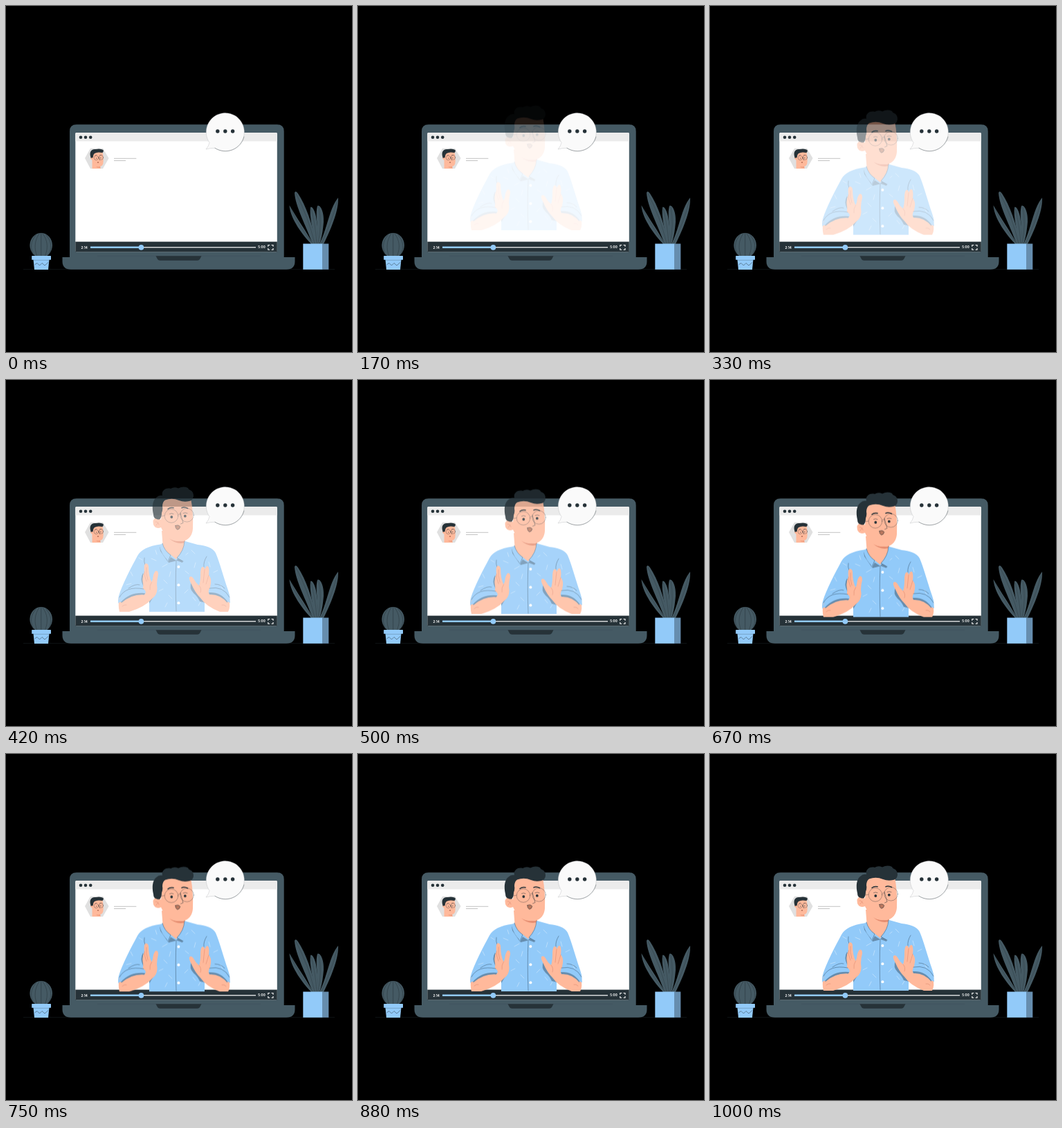
An HTML page for the animation above (1.04 s loop, 500 by 500 pixels).

```html
<!DOCTYPE html>
<html lang="en">
<head>
<meta charset="utf-8">
<title>Video lesson</title>
<style>
  html, body { margin: 0; width: 100%; height: 100%; overflow: hidden; background: #000; }
  svg { display: block; width: 100vw; height: 100vh; }
  text { font: 700 4.5px Inter, "Open Sans", sans-serif; fill: #fff; }
  .slate { fill: #455a64; }
  .ink { fill: #263238; }
  .blue { fill: #92caf9; }
  .shade { fill: #668dae; }
  .skin { fill: #ffb99b; }
  .blush { fill: #e58d70; }
  .line, .fold, .crease { fill: none; stroke-width: .5; stroke-linecap: round; stroke-linejoin: round; }
  .line { stroke: #263238; }
  .fold { stroke: #36536b; }
  .crease { stroke: #d98268; }
  .thin { stroke-width: .35; }
  .bold { stroke-width: 1.6; }
  .man { animation: drop 1040ms infinite; }
  /* The easing overshoots, so the figure dips a little and settles. */
  @keyframes drop {
    0%, 7.6% { opacity: 0; transform: translateY(-20px); }
    7.7% { opacity: .03; transform: translateY(-20px); animation-timing-function: cubic-bezier(.33, .26, .5, 1.38); }
    92.3%, 100% { opacity: 1; transform: none; }
  }
</style>
</head>
<body>
<svg viewBox="0 0 500 500">
  <clipPath id="cut"><rect x="150" y="150" width="190" height="191.2"/></clipPath>
  <path d="M25 380.5H475" stroke="#1b2327" stroke-width=".5"/>

  <g id="cactus">
    <ellipse class="slate" cx="50.7" cy="345.8" rx="16.3" ry="17.8"/>
    <path class="line" d="M50.7 328V362M48 329Q38 344 45 362M53 329Q64 344 56 362M43 331Q32 345 40 360M58 331Q70 345 61 360" stroke-dasharray="2.2 .8"/>
    <path class="blue" d="M39.5 366H62.5L61 381H41Z"/>
    <path class="shade" d="M39.7 366.6H62.4L62.2 367.6H39.9Z"/>
    <rect class="blue" x="37.2" y="361" width="27.8" height="5.8" rx=".6"/>
    <path class="line" d="M42 373.5L45 371.5L48.500 375L52 371.5L56 375L61 370.5"/>
  </g>

  <g id="plant">
    <g class="slate">
      <path d="M441 344C430 332 411 309 409.5 288C420 306 434 326 444 344Z"/>
      <path d="M443 344C434 318 418 290 417 270C418 267 420 268 422 271C433 288 443 314 448 344Z"/>
      <path d="M446 344C444 324 438 304 440 291C443 288 448 299 449 311C451 322 451 335 451 344Z"/>
      <path d="M449 344C453 326 446 303 450 289C454 286 460 298 459 312C458 325 456 336 453 344Z"/>
      <path d="M453 344C462 325 465 308 471 293Q475 283 480 277C481 293 472 318 459 344Z"/>
    </g>
    <path class="line thin" d="M443 343Q423 318 411 292M446 343Q437 305 419 271M449 343Q447 314 441 293M451 343Q457 316 452 290M456 343Q470 314 479 281"/>
    <rect class="blue" x="429.3" y="343.5" width="28" height="37.3"/>
    <rect class="shade" x="457" y="343.5" width="9.3" height="37.3"/>
  </g>

  <g id="laptop">
    <path class="slate" d="M92 364V181Q92 171.300 102 171.300H391.700Q401.700 171.300 401.700 181V364Z"/>
    <path class="slate" d="M81.500 363H417.500V369Q417.500 380.800 405 380.800H94Q81.500 380.800 81.500 369Z"/>
    <path d="M132 361.300H368" stroke="#3c4f58" stroke-width=".5"/>
    <path class="ink" d="M216.500 361.300H282.500L280 366Q279 367.800 276.500 367.800H222.500Q220 367.800 219 366Z"/>
    <rect x="100.300" y="183" width="291.500" height="172.300" rx="1.500" fill="#fff"/>
    <path d="M100.300 195.500V184.500Q100.300 183 101.800 183H390.300Q391.800 183 391.800 184.500V195.500Z" fill="#ebebeb"/>
    <g class="ink">
      <circle cx="108" cy="189.700" r="2.300"/>
      <circle cx="115" cy="189.700" r="2.300"/>
      <circle cx="122.200" cy="189.700" r="2.300"/>
      <rect x="100.300" y="340.600" width="291.500" height="14.700"/>
    </g>
    <path d="M156 220.300H188.300M156 223.500H173" stroke="#999" stroke-width=".6"/>
  </g>

  <g id="player">
    <text x="108.500" y="350.500">2:14</text>
    <text x="364.300" y="350.300">5:00</text>
    <path d="M122 348.800H361" stroke="#d5d8d9" stroke-width="1.500"/>
    <path d="M122 348.800H195" stroke="#92caf9" stroke-width="2.600"/>
    <circle class="blue" cx="195.400" cy="348.900" r="3.800"/>
    <path d="M378.800 347.700V345.500H381.200M383.600 345.500H386V347.700M386 350V352.200H383.600M381.200 352.200H378.800V350" fill="none" stroke="#fff" stroke-width="1.100"/>
  </g>

  <g id="avatar">
    <path d="M114 220L122 205.800H140L148.500 220L140 235H122Z" fill="#e0e0e0"/>
    <path class="skin" d="M125 213Q131 208 139.500 211Q141.500 221 140.300 228Q139 231.500 136 232L137 235H124.500V222.500Q121.800 222 122.300 218.500Z"/>
    <path class="ink" d="M122.800 220Q120.800 214 122 211Q124 206.200 130 207Q136 205.500 140.500 208Q141.500 211 139 212Q132 210.500 128 213Q126 214.500 125.800 218Q125.200 221 124.500 219Z"/>
    <path class="blush" d="M130 232Q134 233 136 232L136.300 233.500Q132 234 130 232Z"/>
    <circle cx="133" cy="226" r="1.100" fill="#b9705a"/>
    <g class="line thin">
      <circle cx="130.400" cy="219.500" r="3.200"/>
      <circle cx="137.400" cy="219" r="3.200"/>
      <path d="M134.300 218L135.500 223M128.500 215.800L131 215.200M135.500 215.300H138"/>
    </g>
    <circle class="ink" cx="130.600" cy="220" r=".6"/>
    <circle class="ink" cx="136.800" cy="219.500" r=".6"/>
  </g>

  <g class="man"><g clip-path="url(#cut)">
    <!-- shirt -->
    <path class="blue" d="M223 244.500C206 247 195 252 190 261C181 278 168 302 163 319Q161 326 163 331L207 318V342H287V318L323 329Q325 322 321 311C314 291 309 271 303 257C299 249 288 246 277 245L259 240L232 242Z"/>
    <path d="M180 284l3 6M192 264l5 3M174 303l7-2M210 265l7 3M216 253l2 6M226 277l7-4M228 296l5 5M238 284l-2 7M221 312l6-3M235 318l5 5M230 335l3-6M258 261l5-4M268 253l5 5M259 283l5 4M274 271l-2 7M293 270l2 7M300 285l6-3M310 303l3 6M258 315l5-5M270 321l4 5M278 333l3-5" fill="none" stroke="#c6e4fd" stroke-width=".8" stroke-linecap="round"/>
    <path class="fold" d="M200 264Q199 269 201 275M290 262Q285 270 286 277M246 268Q244.500 302 246 341M193 303Q187 301 177 308M302 302Q310 302 316 308"/>
    <g fill="#fff">
      <circle cx="249.400" cy="277" r="2"/>
      <circle cx="249.400" cy="303.200" r="2"/>
      <circle cx="249.400" cy="329.300" r="2"/>
    </g>

    <!-- neck and collar -->
    <path class="skin" d="M225 225H259V246L246 266L227 251Z"/>
    <path class="blush" d="M236 236Q246 243 259 238L257 242.500Q245 244.500 236 236Z"/>
    <path class="shade" d="M222 247L223 254L234 270L238 263L246 268L259 251L263 245L255 271L247 268L235 271Z"/>
    <path class="blue" d="M226 243Q229 254 238 260L234.500 268Q225 260 222 247ZM258 240Q264 244 263 248Q260 260 256 269L247 264Q257 254 258 240Z"/>
    <path class="fold" d="M226 243Q229 254 238 260L234.500 268M258 240Q257 254 247 264L256 269"/>

    <!-- head -->
    <path class="skin" d="M226 178H267Q271 198 270 222Q269 236 256 240Q239 241 229 230L224 220Q216 223 213 216Q211 208 217 206Q221 205 224 209Z"/>
    <path class="ink" d="M218 208Q213 207 213 201C211 193 211 182 217 177Q221 173 226 174C224 167 231 162 238 164Q243 161 249 163.500Q256 160 263 163Q264 166 266 166Q271 168 271 175Q270 181 265 182Q257 184 250 181Q240 177 230 180.500Q226 183 226 190Q227 194 225 199Q225 205 222.500 208Q220 209 218 208Z"/>
    <path class="crease" d="M216 212Q219 211 221 216M217 217L220 213"/>
    <path class="line bold" d="M234 193.500Q237 190.800 242 191.800M254 191.700Q258 190 262.500 192.500"/>
    <circle class="ink" cx="239.300" cy="205" r="1.900"/>
    <circle class="ink" cx="258.800" cy="203.700" r="1.900"/>
    <path class="line" d="M236.500 200.500Q239 199 242 200.500M256 199.500Q259 198 262 199.500M252 199L256 213.500L252.500 215"/>
    <g class="line thin">
      <circle cx="239" cy="203.500" r="9.800"/>
      <circle cx="261.500" cy="202.300" r="9.800"/>
      <path d="M248.700 202Q250 199.500 251.700 201M229.300 203L224 204"/>
    </g>
    <path class="line" style="fill: #b9775e" d="M244.800 217.500Q249.500 215.500 251.800 219Q251 223 247.500 223.300Q244.300 221 244.800 217.500Z"/>

    <!-- left arm -->
    <path class="shade" d="M198 286Q193 294 198 304L203 311L196 317L207 323V330L217 314Z"/>
    <path class="skin" d="M164 322Q161.500 333 164 342H178Q201 335 211 323Q219 317 218.500 307Q217 300 220 288Q220 282 216 283Q213 286 212 295L210.500 299Q206 291 206 276Q205 271 201 272.500Q199 275 200 284Q196 292 198 301Q199 309 195 313Q181 313 164 322Z"/>
    <path class="crease" d="M200 284Q200 291 203 298M203 278Q202 286 205 296M210.500 299Q207 304 208 310M168 334Q171 331 174 332"/>
    <path class="blue" d="M162 329Q165 317 177 309Q190 303 200 310Q203 313 201 316Q183 314 168 327Z"/>
    <path class="shade" d="M166 328Q179 313 201 315L200 317.500Q182 316 167 329Z"/>
    <path class="fold" d="M164 321Q173 304 199 309"/>

    <!-- right arm -->
    <path class="shade" d="M268 299Q264 308 271 315Q277 320 280 327L288 329L289 312Z"/>
    <path class="skin" d="M322 323Q325 335 321 342H309Q289 334 281 322Q273 314 268 302Q264 295 265 292Q268 289 271 294Q274 300 279 304Q281 298 281 288Q281 278 284 277Q287 277 287 281Q290 274 292.500 277Q294 281 293 289Q297 293 296 301Q294 308 296 314Q309 313 322 323Z"/>
    <path class="crease" d="M287 281Q286 291 285 300M293 289Q291 296 289 302M279 304Q283 308 281 314M318 334Q315 331 312 332"/>
    <path class="blue" d="M324 329Q322 315 310 308Q301 304 294 308Q292 312 293 315.500Q309 314 319 327Z"/>
    <path class="shade" d="M320 327Q310 313 293 314L294 317Q309 316 320 329Z"/>
    <path class="fold" d="M323 321Q314 304 294 308"/>
  </g></g>

  <g id="bubble">
    <path d="M294 197.500A27.500 27.500 0 1 1 302 205.300Q296 205 289 207Q293 202.500 294 197.500Z" fill="#fafafa" stroke="#b5b9bb" stroke-width=".4"/>
    <path class="line thin" d="M344 189A27.500 27.500 0 0 1 302 205.300"/>
    <g class="ink">
      <circle cx="305.800" cy="181" r="2.700"/>
      <circle cx="316.800" cy="181" r="2.700"/>
      <circle cx="327.600" cy="181" r="2.700"/>
    </g>
  </g>
</svg>
</body>
</html>
```
